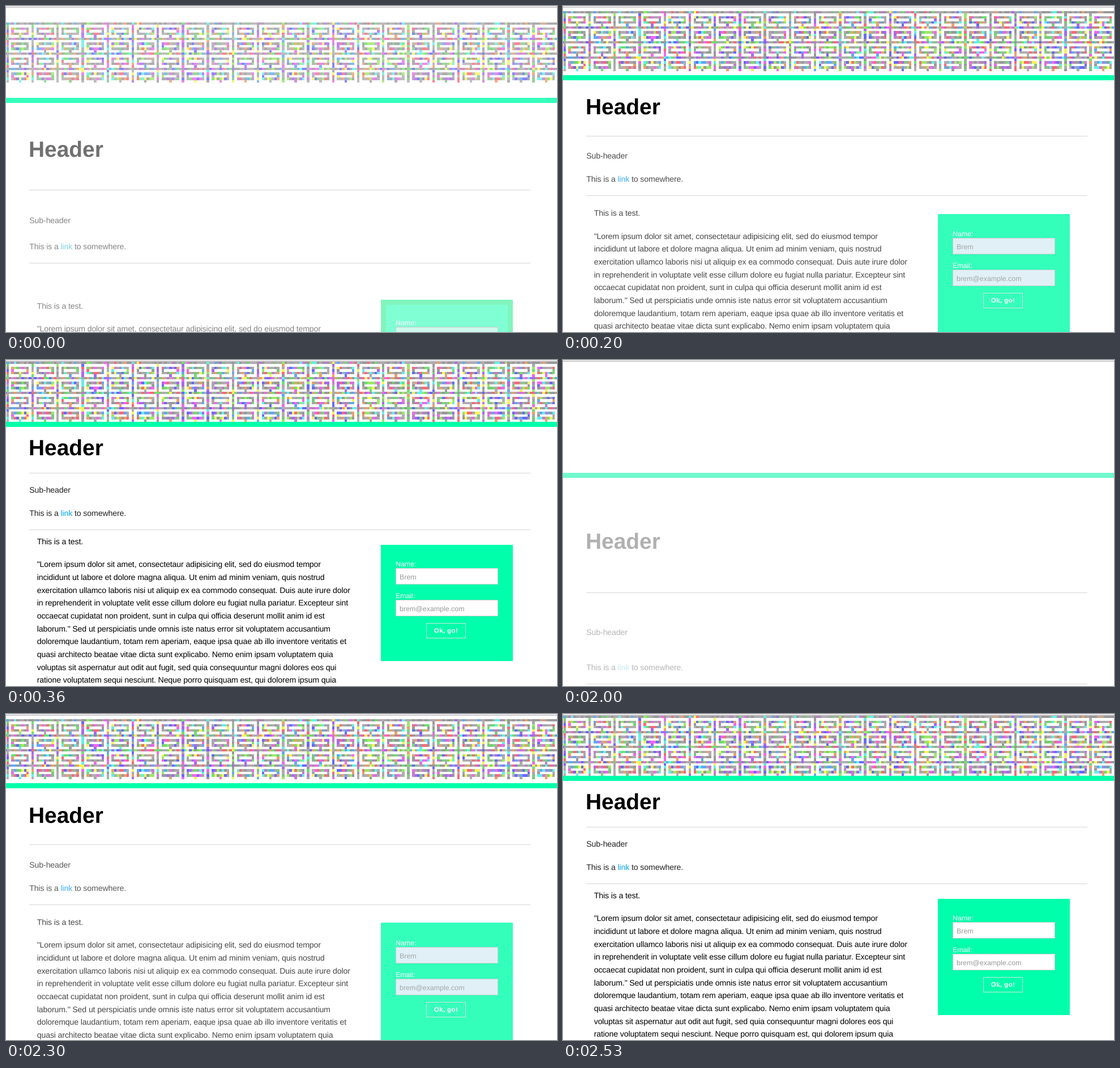
Animation, 973 px wide and 575 px high, one loop 3.9 s. Source, as an HTML page with a canvas:

```html
<!DOCTYPE html>
<html lang="en">
<head>
<meta charset="utf-8">
<title>Page entrance</title>
<style>
html, body { margin: 0; width: 100%; height: 100%; overflow: hidden; background: #fff; }
#page {
  position: relative; width: 973px; height: 575px; overflow: hidden; background: #fff;
  font: 14.16px/22.65px "Liberation Sans", Arial, sans-serif;
  letter-spacing: -.14px; white-space: pre; text-rendering: geometricPrecision;
  /* --k is how far the page is still spread out, 0 = settled */
  --k: 0; --art: 1; --head: 1; --sub: .87; --text: 1;
  --link: #00a8ec; --bar: #00ffaa; --form: #00ffaa; --edge: #00ffaa; --field: #fff; --hint: #999;
  --far: max(0, var(--k) - .4);
  --dLink: calc(var(--k) * 149 + max(0, var(--k) - .77) * 21.7);
  --dText: calc(var(--dLink) + var(--k) * 43 + var(--far) * 20);
  --dForm: calc(var(--dLink) + var(--k) * 22 + var(--far) * 26.7);
  animation: settle 3.9s step-end infinite;
}
#page div, #page canvas { position: absolute; box-sizing: border-box; top: calc((var(--y) + var(--d)) * 1px); }

#art { left: 0; --y: 3; --d: calc(var(--k) * 26.3); opacity: var(--art); }
#bar { left: 0; width: 100%; height: 9px; --y: 109; --d: calc(var(--k) * 53); background: var(--bar); }
#head {
  left: 40px; --y: 135.5; --d: calc(var(--k) * 98.2);
  font-size: 38.9px; line-height: 40px; font-weight: bold; letter-spacing: 0; color: rgb(0 0 0 / var(--head));
}
.rule { left: 41px; width: 885px; height: 1px; background: #d6d6d6; }
#rule1 { --y: 199; --d: calc(var(--k) * 124.8); }
#rule2 { --y: 299; --d: var(--dLink); }
.sub { left: 41.3px; color: rgb(0 0 0 / var(--sub)); }
#sub { --y: 219.3; --d: calc(var(--k) * 148.5); }
#more { --y: 260; --d: var(--dLink); }
#more span { color: var(--link); }
.text { left: 54.7px; --d: var(--dText); color: rgb(0 0 0 / var(--text)); }
#test { --y: 309.8; }
#para { --y: 350.3; }

#form {
  left: 662px; width: 233px; height: calc(205px + var(--k) * 20px); --y: 326; --d: var(--dForm);
  background: var(--form); box-shadow: inset 0 0 0 9px var(--edge);
  font-size: 12.4px; line-height: 16px; letter-spacing: 0; color: #fff;
}
#form div { --d: calc(var(--k) * 7); left: 26px; }
#form .field {
  width: 181px; height: 29px; padding-left: 6px; line-height: 30px;
  border: 1px solid #ccc; background: var(--field); color: var(--hint);
}
#form .go {
  left: 80px; width: 70px; height: 27px; border: 1px solid #d4e4dc; background: var(--edge);
  font-size: 11.5px; line-height: 27px; font-weight: bold; letter-spacing: .4px; text-align: center;
}
#page .chrome { left: 0; top: 0; width: 100%; height: 3px; background: #e9e7e9; border-bottom: 1px solid #bcb8bb; }

@keyframes settle {
  0% {
    --k: 1; --art: .8; --head: .56; --sub: .48; --text: .48; --link: #7fd2e4; --bar: #33ffbb;
    --form: #80ffd4; --edge: #82f5bd; --field: #d0f8ec; --hint: #a8c8bc;
  }
  2.05% {
    --k: .55; --art: .9; --head: .68; --sub: .55; --text: .55; --link: #66bfec; --bar: #11ffb0;
    --form: #66ffcc; --edge: #66ffcc; --field: #d8f0f2; --hint: #9db8b0;
  }
  5.12% {
    --k: .237; --art: 1; --head: 1; --sub: .7; --text: .72; --link: #3bb0ee; --bar: #00ffaa;
    --form: #33ffbb; --edge: #33ffbb; --field: #e0f0f6; --hint: #a0a8a8;
  }
  7.17% {
    --k: .075; --sub: .78; --text: 1; --link: #00a8ec;
    --form: #00ffaa; --edge: #00ffaa; --field: #fafdff; --hint: #999;
  }
  9.23% { --k: 0; --sub: .87; --field: #fff; }
  51.28% {
    --k: 1.69; --art: 0; --head: .31; --sub: .29; --text: .29; --link: #c8e8f0; --bar: #70f8cc;
    --form: #b0ffe4; --edge: #b0f8d8; --field: #e8fcf4; --hint: #c0d8d0;
  }
  54.1% {
    --k: .82; --art: .85; --head: .58; --sub: .5; --text: .5; --link: #7fcdea; --bar: #22ffb6;
    --form: #77ffd4; --edge: #7af5b4; --field: #d2f4ee; --hint: #9cc4b4;
  }
  56.66% {
    --k: .398; --art: 1; --head: .67; --sub: .58; --text: .58; --link: #55b2ee; --bar: #00ffaa;
    --form: #55ffff; --edge: #72f4a4; --field: #d8ecf4; --hint: #8ab8a4;
  }
  58.97% {
    --k: .245; --head: 1; --sub: .65; --text: .72; --link: #3bb0ee;
    --form: #33ffbb; --edge: #33ffbb; --field: #e0f0f6; --hint: #a0a8a8;
  }
  61.28% {
    --k: .143; --sub: .68; --text: 1; --link: #00a8ec;
    --form: #00ffaa; --edge: #00ffaa; --field: #f9fdff; --hint: #999;
  }
  63.33% { --k: .006; --sub: .82; }
  64.87%, 100% {
    --k: 0; --art: 1; --head: 1; --sub: .87; --text: 1; --link: #00a8ec; --bar: #00ffaa;
    --form: #00ffaa; --edge: #00ffaa; --field: #fff; --hint: #999;
  }
}
</style>
</head>
<body>
<div id="page"><canvas id="art" width="973" height="106"></canvas><div id="bar"></div><div id="head">Header</div><div id="rule1" class="rule"></div><div id="sub" class="sub">Sub-header</div><div id="more" class="sub">This is a <span>link</span> to somewhere.</div><div id="rule2" class="rule"></div><div id="test" class="text">This is a test.</div><div id="para" class="text">"Lorem ipsum dolor sit amet, consectetaur adipisicing elit, sed do eiusmod tempor
incididunt ut labore et dolore magna aliqua. Ut enim ad minim veniam, quis nostrud
exercitation ullamco laboris nisi ut aliquip ex ea commodo consequat. Duis aute irure dolor
in reprehenderit in voluptate velit esse cillum dolore eu fugiat nulla pariatur. Excepteur sint
occaecat cupidatat non proident, sunt in culpa qui officia deserunt mollit anim id est
laborum." Sed ut perspiciatis unde omnis iste natus error sit voluptatem accusantium
doloremque laudantium, totam rem aperiam, eaque ipsa quae ab illo inventore veritatis et
quasi architecto beatae vitae dicta sunt explicabo. Nemo enim ipsam voluptatem quia
voluptas sit aspernatur aut odit aut fugit, sed quia consequuntur magni dolores eos qui
ratione voluptatem sequi nesciunt. Neque porro quisquam est, qui dolorem ipsum quia</div><div id="form"><div style="--y:26">Name:</div><div class="field" style="--y:41">Brem</div><div style="--y:82">Email:</div><div class="field" style="--y:97">brem@example.com</div><div class="go" style="--y:138">Ok, go!</div></div><div class="chrome"></div></div>
<script>
const ctx = document.getElementById('art').getContext('2d');
const cell = 4.423;
const tile = [
  '##########',
  '#.........',
  '#.#######.',
  '#.#.....#.',
  '#.#######.',
  '#....#....'
];
const hues = ['#6de070', '#f268ea', '#6a68fa', '#62f0e8', '#f4f458', '#f86a78',
              '#eca068', '#a868f0', '#9ce868', '#62a8f6', '#c47ad0', '#7cc87c'];
const greys = ['#999', '#a8a8a8', '#b0acb0'];

let seed = 41;
const rand = () => (seed = seed * 16807 % 2147483647) / 2147483647;
const pick = list => list[Math.floor(rand() * list.length)];

for (let row = 0; row < 24; row++) {
  for (let col = -1; col < 220; col++) {
    if (tile[row % 6][(col + 10) % 10] !== '#') continue;
    const x = Math.round(0.6 + col * cell), y = Math.round(row * cell);
    const right = Math.round(0.6 + (col + 1) * cell), bottom = Math.round((row + 1) * cell);
    const greyShare = row ? 0.4 : 0.75;
    ctx.fillStyle = pick(rand() < greyShare ? greys : hues);
    ctx.fillRect(x, y, right - x, bottom - y);
  }
}
</script>
</body>
</html>
```
